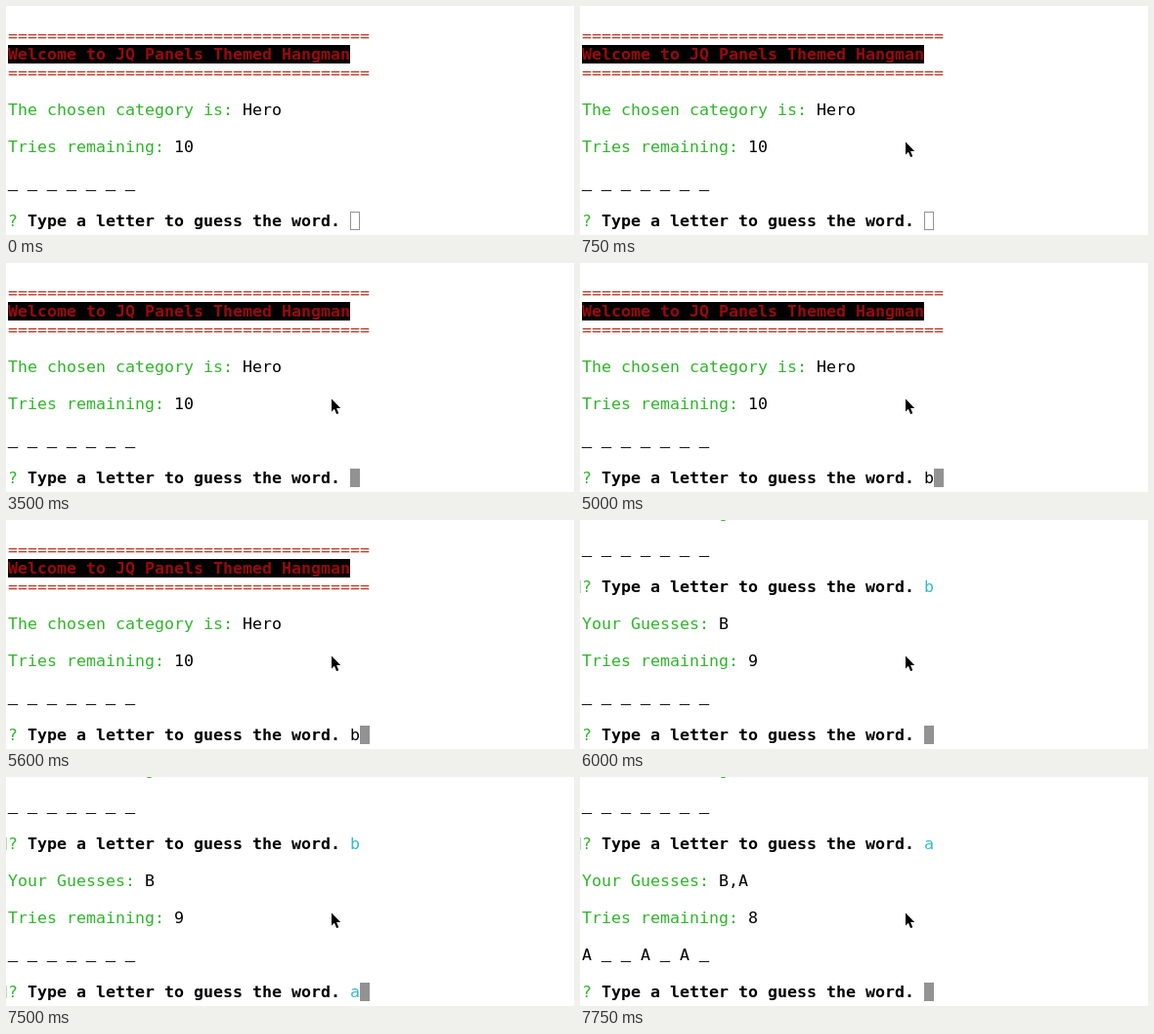
An HTML page that plays this animation: 581 px wide and 235 px high, repeating every 8 s.

```html
<!DOCTYPE html>
<html lang="en">
<head>
<meta charset="utf-8">
<title>Hangman in the terminal</title>
<style>
  html, body { margin: 0; width: 100%; height: 100%; overflow: hidden; background: #fff; }
  #stage { position: relative; width: 581px; height: 235px; overflow: hidden; }
  #terminal {
    position: absolute; left: 2px; bottom: 5px; margin: 0; color: #000;
    font: 16.61px/19px "DejaVu Sans Mono", monospace;
  }
  .red { color: #c23621; }
  .green { color: #2fb62a; }
  .cyan { color: #33bbc8; }
  .title { color: #990a0e; background: #000; font-weight: bold; }
  .blank { position: relative; top: -2px; -webkit-text-stroke: .4px; }
  .cursor { background: #929292; }
  .cursor.hollow { background: none; box-shadow: inset 0 0 0 1px #929292; }
  .mark { position: relative; }
  .mark::before {
    content: ""; position: absolute; left: -2px; top: 3px;
    width: 1px; height: 13px; background: #b5dfaf;
  }
  #pointer { position: absolute; left: 0; top: 0; }
</style>
</head>
<body>
<div id="stage">
  <pre id="terminal"></pre>
  <svg id="pointer" width="581" height="235">
    <path d="M333 139.5v13l2.9-2.7 2.2 5.3 2.2-.9-2.2-5.1h4.1z"
          stroke="#fff" stroke-width="1.6" paint-order="stroke"/>
  </svg>
</div>
<script>
const LOOP = 8000;
const terminal = document.getElementById('terminal');
const pointer = document.getElementById('pointer');

const span = (name, text) => `<span class="${name}">${text}</span>`;
const field = (label, value) => span('green', label + ':') + ' ' + value;
const word = letters => letters.replace(/_/g, span('blank', '_')).split(/(?<=[A-Z]|<\/span>)/).join(' ');
const prompt = (input, marked) =>
  span(marked ? 'green mark' : 'green', '?') + ' <b>Type a letter to guess the word.</b> ' + input;

const rule = span('red', '='.repeat(37));
const intro = [
  rule, span('title', 'Welcome to JQ Panels Themed Hangman'), rule, '',
  field('The chosen category is', 'Hero'), ''
];
const turn = (tries, letters) => [field('Tries remaining', tries), '', word(letters), ''];
const answered = (letter, guesses) =>
  [prompt(span('cyan', letter), true), '', field('Your Guesses', guesses), ''];

// Lines are anchored to the bottom, so a longer history scrolls up by itself.
function screen(t) {
  const lines = [...intro, ...turn(10, '_______')];
  if (t >= 6000) lines.push(...answered('b', 'B'), ...turn(9, '_______'));
  if (t >= 7750) lines.push(...answered('a', 'B,A'), ...turn(8, 'A__A_A_'));

  const accepted = t >= 7500 && t < 7750;
  const typed = accepted ? span('cyan', 'a') : t >= 5000 && t < 6000 ? 'b' : '';
  const cursor = span(t < 1250 ? 'cursor hollow' : 'cursor', ' ');
  lines.push(prompt(typed + cursor, accepted));
  return lines.join('\n');
}

let shown;
function draw() {
  const t = performance.now() % LOOP;
  const html = screen(t);
  if (html !== shown) terminal.innerHTML = shown = html;
  pointer.style.visibility = t < 750 ? 'hidden' : 'visible';
  requestAnimationFrame(draw);
}
draw();
</script>
</body>
</html>
```
